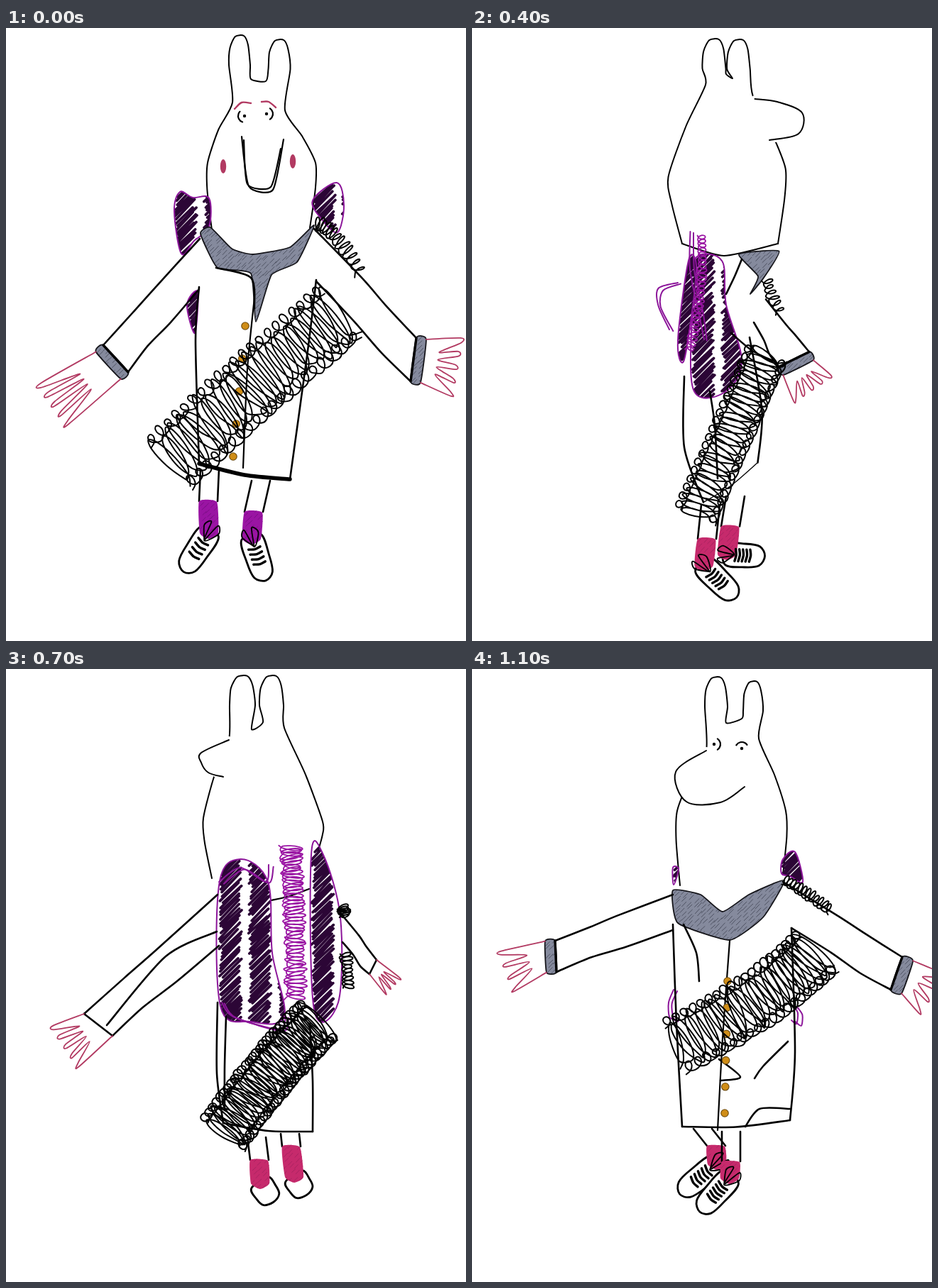
An HTML page with a canvas that plays this animation: 648 by 864 pixels, repeating every 1.2 s.

```html
<!DOCTYPE html>
<html lang="en">
<head>
<meta charset="utf-8">
<title>Turning figure</title>
<style>
html, body { margin: 0; width: 100%; height: 100%; overflow: hidden; background: #fff; }
canvas { display: block; }
</style>
</head>
<body>
<canvas id="stage" width="648" height="864"></canvas>
<script>
const ctx = document.getElementById('stage').getContext('2d');
const STEP = 100, STEPS = 12;
const KEYS = [0, 1, 3, 5, 7, 8, 11];
const BLACK = '#000', VIOLET = '#8c159a', PLUM = '#9a14a3', ROSE = '#c62a6c', SKIN = '#b23a62';

let seed = 1;
const rand = () => (seed = seed * 16807 % 2147483647) / 2147483647;
const lerp = (a, b, k) => a + (b - a) * k;
const mix = (p, q, k) => [lerp(p[0], q[0], k), lerp(p[1], q[1], k)];
const move = (p, v, d) => [p[0] + v[0] * d, p[1] + v[1] * d];
const minus = (p, q) => [p[0] - q[0], p[1] - q[1]];
const unit = v => { const d = Math.hypot(...v) || 1; return [v[0] / d, v[1] / d]; };
const turn = v => [-v[1], v[0]];
const points = n => Array.from({ length: n.length >> 1 }, (_, i) => [n[2 * i], n[2 * i + 1]]);

// --- pen ---

function trace(pts, closed, bend = 7) {
  const n = pts.length;
  const at = i => closed ? pts[(i + n) % n] : pts[Math.max(0, Math.min(n - 1, i))];
  ctx.beginPath();
  ctx.moveTo(...pts[0]);
  for (let i = 0; i < (closed ? n : n - 1); i++) {
    const p = at(i), q = at(i + 1);
    ctx.bezierCurveTo(...move(p, minus(q, at(i - 1)), 1 / bend),
      ...move(q, minus(at(i + 2), p), -1 / bend), ...q);
  }
}

function stroke(pts, color = BLACK, width = 2.6, closed = false, bend = 7) {
  trace(pts, closed, bend);
  ctx.strokeStyle = color;
  ctx.lineWidth = width;
  ctx.stroke();
}

function fill(pts, color, bend = 12) {
  trace(pts, true, bend);
  ctx.fillStyle = color;
  ctx.fill();
}

function oval([x, y], rx, ry, color) {
  ctx.beginPath();
  ctx.ellipse(x, y, rx, ry, 0, 0, 7);
  ctx.fillStyle = color;
  ctx.fill();
}

// Slanted marks inside a closed shape.
function hatch(pts, color, gap, width, length, bend) {
  const xs = pts.map(p => p[0]), ys = pts.map(p => p[1]);
  const left = Math.min(...xs), right = Math.max(...xs), bottom = Math.max(...ys);
  ctx.save();
  trace(pts, true, bend);
  ctx.clip();
  ctx.beginPath();
  for (let y = Math.min(...ys); y < bottom + right - left; y += gap)
    for (let x = left; x < right; x += length * 1.6) {
      const sx = x + rand() * 6, sy = y - sx + left + rand() * 3;
      ctx.moveTo(sx, sy);
      ctx.lineTo(sx + length, sy - length * (.9 + rand() * .2));
    }
  ctx.strokeStyle = color;
  ctx.lineWidth = width;
  ctx.stroke();
  ctx.restore();
}

function cloth(pts) {
  fill(pts, '#858a9d');
  hatch(pts, '#4f5363', 6, 1, 6, 12);
  stroke(pts, '#15151a', 1.8, true, 12);
}

// Loops across a bowed axis, with small curls along both edges.
function scribble([half, loops, ...n], color, width) {
  const [a, m, b] = points(n);
  const bow = [2 * m[0] - (a[0] + b[0]) / 2, 2 * m[1] - (a[1] + b[1]) / 2];
  const place = (u, across, along) => {
    const p = mix(a, bow, u), q = mix(bow, b, u), t = unit(minus(q, p));
    return move(move(mix(p, q, u), t, along), turn(t), across);
  };
  const coil = (turns, center, radius, reach) => {
    const pts = [];
    let size, lean;
    for (let i = 0; i <= turns * 8; i++) {
      if (i % 8 === 0) { size = .75 + rand() * .35; lean = (rand() - .5) * .4; }
      const angle = i * Math.PI / 4, across = radius * size * Math.cos(angle);
      pts.push(place(i / turns / 8, center + across, reach * Math.sin(angle) + across * lean));
    }
    stroke(pts, color, width);
  };
  coil(Math.round(loops), 0, half * .95, Math.max(4, half * .24));
  if (half > 20)
    for (const side of [-1, 1]) coil(Math.round(loops * .7), side * half * .88, half * .2, 8);
}

// --- body parts ---

function ear(a, tip, b) {
  const w = Math.abs(b[0] - a[0]) / 2 + 2, [x, y] = tip;
  return [a, [x - w, y + 42], [x - w * .9, y + 18], [x - w * .4, y + 2],
    [x + w * .4, y + 1], [x + w * .8, y + 14], [x + w, y + 42], b];
}

function head(n) {
  const [base, tip, gap, gap2, tip2, base2, low, cheek, cheek2, low2] = points(n);
  stroke([low, move(mix(low, cheek, .6), [-1, 0], 3), cheek, move(mix(cheek, base, .55), [-1, 0], 4),
    ...ear(base, tip, gap), ...ear(gap2, tip2, base2),
    move(mix(base2, cheek2, .5), [1, 0], 3), cheek2, move(mix(cheek2, low2, .4), [1, 0], 3), low2], BLACK, 2, false, 8);
}

function snout(n) {
  const pts = points(n);
  fill(pts, '#fff', 6);
  stroke([pts[pts.length - 1], pts[0]], '#fff', 10);
  stroke(pts, BLACK, 2, false, 6);
}

function eyes(n) {
  for (let i = 0; i < n.length; i += 3) {
    const [x, y, look] = n.slice(i, i + 3);
    oval([x, y], 2.2, 2.2, BLACK);
    ctx.beginPath();
    ctx.arc(x, y, 9, look - 1, look + 1);
    ctx.strokeStyle = BLACK;
    ctx.lineWidth = 2.2;
    ctx.stroke();
  }
}

function arm(n) {
  const [top, a, pit, b, tip] = points(n.slice(0, 10)), [cuff, fingers] = n.slice(10);
  const edge = minus(b, a), size = Math.hypot(...edge), toTip = minus(tip, a);
  let out = turn(unit(edge));
  if (out[0] * toTip[0] + out[1] * toTip[1] < 0) out = [-out[0], -out[1]];
  stroke([top, move(mix(top, a, .45), out, 3), mix(top, a, .7), a]);
  stroke([pit, mix(pit, b, .4), move(mix(pit, b, .7), turn(out), 3), b]);
  const endA = move(a, out, cuff), endB = move(b, out, cuff);
  if (cuff > 0) cloth([a, b, endB, endA]);
  stroke([a, b], BLACK, cuff ? 3.4 : 2.6);
  if (fingers) hand(endA, endB, tip, size * 1.25, Math.round(fingers));
}

function hand(a, b, tip, spread, fingers) {
  const wrist = mix(a, b, .5), reach = minus(tip, wrist);
  let side = turn(unit(reach));
  if (side[0] * (b[0] - a[0]) + side[1] * (b[1] - a[1]) < 0) side = [-side[0], -side[1]];
  const spot = (along, t) => move(move(wrist, reach, along), side, spread * t);
  const pts = [a];
  for (let i = 0; i < fingers; i++) {
    const t = i / (fingers - 1) - .5;
    pts.push(spot(.97, t - .04), spot(1.02, t + .04));
    if (i < fingers - 1) pts.push(spot(.42, (t + .12) * .55));
  }
  stroke([...pts, b], SKIN, 1.8);
}

function fist([x, y]) {
  const pts = [[x, y - 20], [x + 22, y - 26], [x + 26, y - 54], [x + 36, y - 60], [x + 39, y - 48], [x + 39, y - 14]];
  for (let i = 0; i < 4; i++)
    pts.push([x + 43, y - 12 + i * 10], [x + 42, y - 5 + i * 10], [x + 34, y - 3 + i * 10]);
  stroke([...pts, [x + 18, y + 28], [x, y + 20]], SKIN, 1.8);
}

function coat(n) {
  const [a, b, c, d, e, f] = points(n), hem = n[12];
  stroke([a, b, c]);
  stroke([d, e, f]);
  if (hem) stroke([c, move(mix(c, f, .5), [0, 1], 5), f], BLACK, hem);
}

function buttons([x, y, x2, y2, count]) {
  count = Math.round(count);
  for (let i = 0; i < count; i++) {
    const p = mix([x, y], [x2, y2], i / (count - 1));
    oval(p, 5.8, 5.8, '#6b4a10');
    oval(p, 4.7, 4.7, '#cf8d17');
  }
}

function leg(n, step) {
  const [hip, sock, ankle, toe] = points(n), laces = Math.round(n[8]);
  const way = unit(minus(toe, ankle)), across = turn(way);
  const spot = (k, w) => move(mix(ankle, toe, k), across, w);
  for (const s of [-13, 13]) stroke([[hip[0] + s, hip[1]], [sock[0] + s, sock[1]]]);
  const shoe = [spot(-.05, 14), spot(.5, 17), spot(.9, 14), spot(1.05, 0),
    spot(.9, -13), spot(.5, -16), spot(-.05, -14)];
  fill(shoe, '#fff', 6);
  stroke(shoe, BLACK, 2.8, true, 6);
  const wool = [[sock[0] - 13, sock[1]], [sock[0] + 12, sock[1] + 1],
    [ankle[0] + 13, ankle[1]], [ankle[0], ankle[1] + 8], [ankle[0] - 13, ankle[1]]];
  fill(wool, step < 3 ? PLUM : ROSE);
  hatch(wool, step < 3 ? '#7b0f86' : '#a92360', 8, 1, 5, 12);
  for (let i = 0; i < laces; i++) {
    const k = .22 + i * .5 / laces;
    stroke([spot(k, 9), spot(k + .04, 0), spot(k + .02, -8)], BLACK, 3.4);
  }
  if (laces) stroke([spot(.2, 0), spot(-.1, 12), spot(-.25, 6), spot(.2, 0), spot(-.1, -12), spot(-.25, -5), spot(.2, 0)], BLACK, 1.8);
}

function wing(n) {
  const pts = points(n);
  hatch(pts, '#2c0636', 5, 3.7, 26, 6);
  stroke(pts, VIOLET, 2, true, 6);
}

function ribbon(n) {
  const pts = points(n);
  stroke(pts, VIOLET, 2);
  stroke(pts.map(p => move(p, [1, .4], 3 + rand() * 4)), VIOLET, 2);
}

function folds(n) {
  for (let i = 0; i < n.length; i += 6) stroke(points(n.slice(i, i + 6)));
}

const line = n => stroke(points(n), BLACK, 2.2, false, 9);
const collar = n => cloth(points(n));
const boa = n => scribble(n, BLACK, 2);
const coil = n => scribble(n, PLUM, 1.8);
const brow = n => stroke(points(n), SKIN, 2.4);
const blush = n => points(n).forEach(p => oval(p, 4.2, 10, SKIN));

// --- motion: one value per key pose, null while the part is hidden ---

const tracks = [];
const track = (draw, ...keys) =>
  tracks.push({ draw, keys: KEYS.map((_, i) => keys[i] ? keys[i].split(' ').map(Number) : null) });

track(head,
  '319 105 329 10 345 72 366 75 385 16 393 116 290 285 284 190 436 190 428 282',
  '318 110 326 9 343 75 366 74 383 15 396 117 285 288 279 215 436 212 431 288',
  '332 80 346 12 362 62 364 62 373 26 390 92 300 308 274 205 443 203 432 306',
  '326 80 336 18 354 68 370 80 378 6 401 98 292 300 279 215 440 192 430 302',
  '314 100 333 9 346 85 362 75 374 9 392 83 290 295 278 210 446 215 438 262',
  '328 94 349 18 364 90 366 80 372 24 380 78 300 308 278 220 446 208 436 277',
  '330 115 344 11 358 76 380 70 396 17 404 98 293 305 289 200 442 200 438 290');
track(line, null, null, '300 308 360 320 432 306', '292 300 350 322 430 302', '374 326 400 320 427 310', '300 308 370 324 415 314');
track(snout, null, null,
  '396 102 440 107 498 124 490 166 424 172',
  '401 98 420 101 432 115 430 132 414 144',
  '314 100 275 118 275 132 285 146 306 152',
  '328 94 300 110 240 126 247 155 306 162',
  '330 115 287 145 302 187 350 188 384 166');
track(line,
  '332 153 342 223 376 228 391 157',
  '337 132 333 152 362 188 391 192',
  '408 155 412 169 424 172 425 163');
track(line, '335 158 340 220 373 224 387 170', '366 113 376 111 386 112 396 117');
track(eyes, '336 124 2.9 367 121 0', '343 106 2.2 373 100 0', '405 106 1.5', null, null, '310 112 1.2', '380 112 -1.6 341 106 0');
track(brow, '322 114 332 105 345 106');
track(brow, '360 104 370 104 380 112');
track(blush, '306 195 404 188');

track(wing,
  '286 240 263 239 245 231 237 258 247 318 265 300 286 280',
  '283 238 262 238 240 234 228 258 240 335 260 306 283 288', null,
  '314 326 352 328 358 390 380 470 355 514 312 510 310 400',
  '300 305 330 268 369 300 375 400 392 490 345 497 302 475');
track(wing, '432 243 466 218 476 250 467 288 445 270', null, null,
  '305 328 316 335 310 400 298 470 290 440',
  '430 262 447 262 471 350 468 470 434 480',
  '424 360 442 350 451 430 447 525 428 480',
  '438 268 455 258 466 300 448 292 436 288');
track(wing, '270 372 255 390 266 430', '250 408 260 452 243 420', null, null, null, null, '283 280 291 282 284 304');
track(ribbon, null, '434 240 440 250 437 270 432 282', '280 268 250 252 245 285 270 370',
  '300 450 275 482 280 498 286 480', '300 300 330 280 366 300 370 276', null, '284 452 277 470 278 490 286 495');
track(ribbon, null, null, '262 248 256 290 264 340 286 368', '353 326 358 390 374 460 368 510',
  '304 470 320 490 384 508 394 490', null, '453 475 459 485 457 500 450 495');
track(coil, null, null, null, '7 26 323 292 322 370 306 455', '16 44 401 250 406 350 408 465', '9 50 428 280 430 360 435 450');

track(collar,
  '274 290 288 281 318 311 348 319 400 309 434 278 410 330 374 348 352 414 345 346 298 338',
  '282 292 325 318 355 322 427 288 418 322 375 350 305 345',
  '360 320 437 305 412 354 372 338',
  '392 318 428 324 410 350 412 412 403 350', null,
  '297 326 333 316 318 353',
  '283 312 322 318 353 342 390 318 440 298 410 350 363 382 290 358');
track(coat,
  '272 365 267 440 272 614 437 355 425 455 400 636 5.5',
  '255 400 275 500 294 632 424 337 420 500 414 616 2.6',
  '290 470 295 570 312 682 412 360 432 530 400 650 2.6',
  '308 512 303 612 340 655 370 512 385 550 405 575 0',
  '298 470 297 570 306 640 428 500 432 580 432 652 2.6',
  '318 505 305 575 335 660 443 530 445 600 420 662 2.6',
  '283 360 288 500 296 645 450 365 455 540 448 636 2.6');
track(line, '350 380 340 480 334 620', '375 352 362 500 368 628', null, null, null, '342 515 343 590 351 660', '363 383 353 520 346 650');
track(folds,
  '296 338 345 352 350 395',
  '230 365 234 395 217 425 278 360 300 410 308 430 275 490 290 580 330 623 330 549 345 540 358 530',
  '348 318 335 355 310 395 302 448 325 453 352 446 416 515 414 545 375 582 390 560 390 625 353 648',
  '365 430 395 455 426 470 380 326 370 350 358 375 335 512 342 560 346 635',
  '297 370 225 405 142 502 310 490 308 560 308 620',
  '335 405 280 470 265 488 322 350 310 375 322 386 375 310 375 420 378 520 398 450 403 475 410 498',
  '298 360 316 400 320 440 445 525 410 560 398 577 348 550 378 575 350 580 448 620 405 620 385 645');
track(arm,
  '273 297 137 447 272 368 172 485 68 530 14 5',
  '278 295 118 502 277 362 153 520 92 572 14 5',
  '302 310 188 585 290 468 224 598 178 658 14 5', null,
  '298 318 110 486 300 390 150 517 84 532 0 5',
  '320 386 222 498 345 405 250 522 184 570 16 5',
  '283 318 117 383 283 368 119 427 50 426 14 4');
track(arm,
  '434 283 578 437 437 357 570 498 634 478 14 5',
  '430 292 557 390 424 338 557 447 608 410 10 0',
  '420 350 465 407 412 360 447 415 487 420 9 5',
  '408 415 485 506 382 470 418 540 472 596 17 5',
  '472 345 522 410 474 385 512 430 544 446 0 4', null,
  '438 300 606 406 450 365 590 452 648 458 16 4');
track(fist, null, '567 422');
track(buttons, '337 420 320 604 5', '358 383 350 600 6', '408 376 417 575 6', null, null, '321 481 311 534 3', '360 440 356 626 6');
track(boa,
  '46 30 228 615 350 502 470 400',
  '36 23 266 660 285 525 440 375',
  '31 36 283 708 340 535 406 365',
  '28 20 345 668 392 605 425 550',
  '37 40 305 655 375 565 440 495',
  '41 38 334 485 375 425 412 345',
  '40 28 284 532 400 467 485 397');
track(boa,
  '11 13 437 275 465 295 500 345',
  '8 4 430 285 440 293 450 303',
  '8 3 422 338 425 343 428 348',
  '9 9 409 370 420 410 443 455',
  '9 5 474 335 476 341 478 348', null,
  '9 12 440 297 470 315 505 340');
track(boa, null, null, null, null, '9 9 478 400 481 425 482 450', '11 16 428 675 450 640 456 585');
track(leg,
  '287 622 285 667 286 712 252 764 4', '309 634 306 676 305 702 304 757 5',
  '325 684 322 740 318 778 360 848 5', '347 660 340 700 335 738 381 753 4',
  '353 660 357 692 358 725 376 750 0', '362 662 370 696 372 734 316 750 0',
  '325 648 344 672 345 698 295 738 5');
track(leg,
  '359 638 349 682 346 720 365 776 4', '372 626 361 672 358 702 378 756 5',
  '370 660 356 710 350 758 418 774 5', '372 660 372 695 368 726 402 714 4',
  '400 655 402 673 406 716 423 740 0', '403 662 403 682 409 722 404 750 0',
  '365 652 365 694 363 718 323 763 5');
track(line, null, null, null, null, null, '566 442 570 445 573 446');

// Parts present on both sides are blended; others follow the nearer pose.
function valueAt({ draw, keys }, step) {
  let i = KEYS.length - 1;
  while (KEYS[i] > step) i--;
  const a = keys[i], b = keys[i + 1];
  if (KEYS[i] === step) return a;
  const k = (step - KEYS[i]) / (KEYS[i + 1] - KEYS[i]), near = k < .5 ? a : b;
  if (!a || !b || draw === folds) return near;
  return near.map((v, j) => j < a.length && j < b.length ? lerp(a[j], b[j], k) : v);
}

let shown = -1;
function frame() {
  const step = Math.floor(performance.now() / STEP) % STEPS;
  if (step !== shown) {
    shown = step;
    seed = 977 + step * 131;
    ctx.fillStyle = '#fff';
    ctx.fillRect(0, 0, 648, 864);
    ctx.lineCap = ctx.lineJoin = 'round';
    for (const part of tracks) {
      const value = valueAt(part, step);
      if (value) part.draw(value, step);
    }
  }
  requestAnimationFrame(frame);
}
frame();
</script>
</body>
</html>
```
